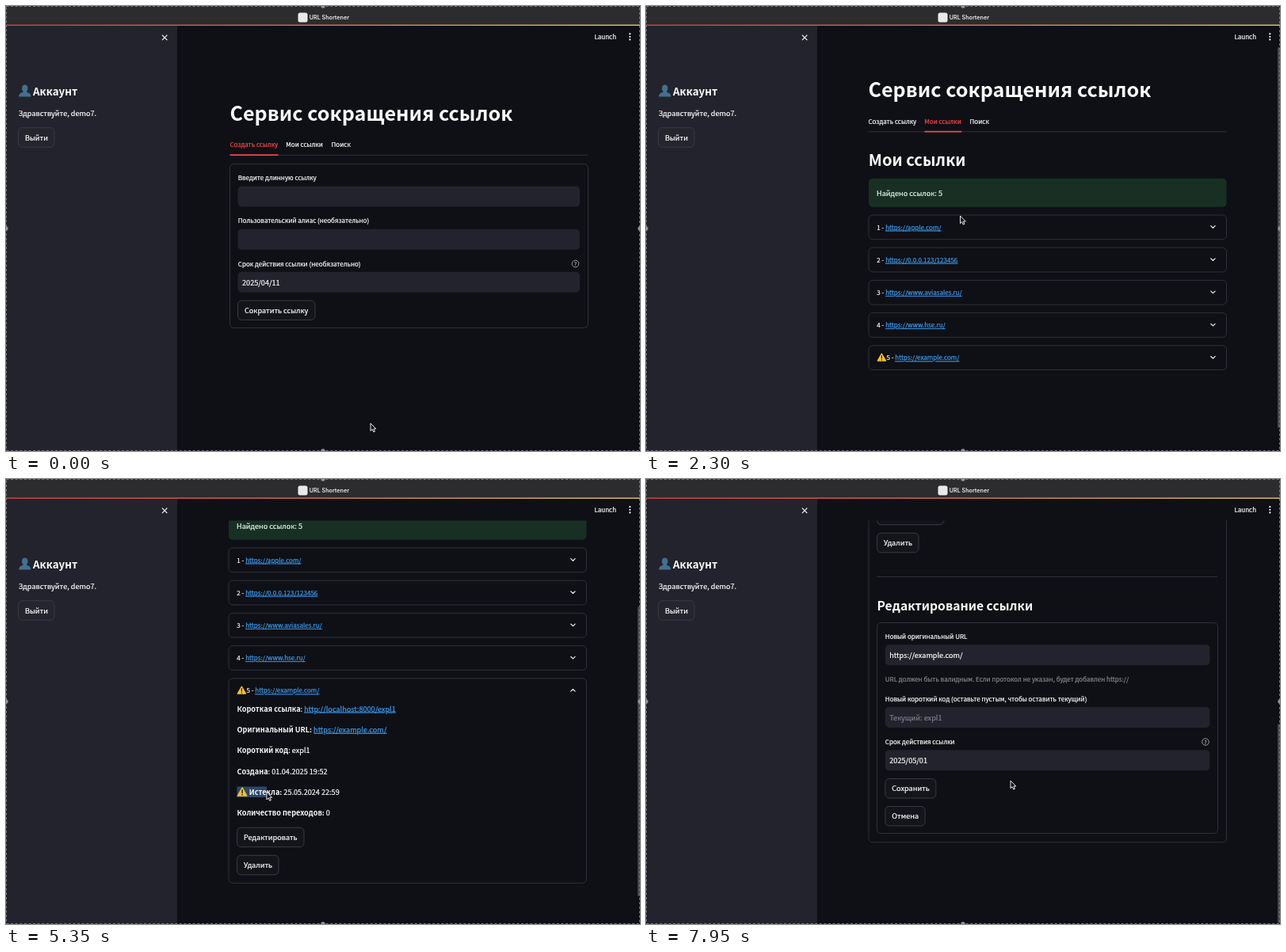
Animation of 800 by 562 pixels, one loop 8 s. Source, as an HTML page:

```html
<!DOCTYPE html>
<html lang="ru">
<head>
<meta charset="utf-8">
<title>URL Shortener</title>
<style>
html, body { margin: 0; width: 100%; height: 100%; overflow: hidden; background: #0e1015; }
svg { display: block; width: 100vw; height: 100vh; }
text {
  font-family: 'Noto Sans CJK JP', 'Noto Sans CJK SC', 'Noto Sans CJK', 'Noto Sans', sans-serif;
  white-space: pre; fill: currentColor; stroke: currentColor; stroke-width: .22px;
}
text[font-weight] { stroke: none; }
.link { color: #3d9df3; fill: currentColor; stroke: currentColor; text-decoration: underline; text-decoration-thickness: .6px; }
.b { font-weight: 700; stroke: none; }
</style>
</head>
<body>
<svg id="stage" viewBox="0 0 800 562" xmlns="http://www.w3.org/2000/svg"></svg>
<script>
const LOOP = 8000;
const WHITE = '#fafafa', RED = '#f8474b', LINE = '#303138', PANEL = '#22232c', BG = '#0e1015', FACE = '#13151b';
const FONT_SCALE = 0.932;
const BODY = 9.82, SMALL = 8.6;

// Markup helpers
const text = (x, y, str, size = BODY, attrs = '') =>
  `<text x="${x}" y="${y}" font-size="${(size * FONT_SCALE).toFixed(2)}" color="${WHITE}" ${attrs}>${str}</text>`;
const rect = (x, y, w, h, fill, attrs = '') =>
  `<rect x="${x}" y="${y}" width="${w}" height="${h}" fill="${fill}" ${attrs}/>`;
const box = (x, y, w, h, attrs = '') => rect(x, y, w, h, 'none', `rx="5" stroke="${LINE}" ${attrs}`);
const link = url => `<tspan class="link">${url}</tspan>`;
const bold = str => `<tspan class="b">${str}</tspan>`;
const button = (x, y, w, label, id = '', face = FACE) =>
  `<g id="${id}">${rect(x, y, w, 24.5, face, 'rx="5" stroke="#393a42"')}${text(x + 8.5, y + 15.8, label)}</g>`;
const field = (x, y, w, value = '', color = WHITE) =>
  rect(x, y, w, 26, PANEL, 'rx="5"') + text(x + 5.5, y + 16.7, value, BODY, `style="color:${color}"`);
const help = (x, y) =>
  `<circle cx="${x}" cy="${y}" r="4.3" fill="none" stroke="#a5a6ab" stroke-width=".9"/>` +
  text(x, y + 2.5, '?', 7, 'text-anchor="middle" style="color:#c0c1c5"');
const warn = (x, y, s) => `<g transform="translate(${x} ${y}) scale(${s})">
  <path d="M6 1 L11.3 10.2 H.7Z" fill="#f9c02f" stroke="#f9c02f" stroke-width="1.2" stroke-linejoin="round"/>
  <path d="M6 3.6V7" stroke="#27231c" stroke-width="1.3" stroke-linecap="round"/>
  <circle cx="6" cy="9" r=".75" fill="#27231c"/></g>`;

const urls = ['https://apple.com/', 'https://0.0.0.123/123456', 'https://www.aviasales.ru/',
  'https://www.hse.ru/', 'https://example.com/'];
const cardY = i => 293.5 + 41.2 * i;
const CARD_H = 30.7, LAST = 4, OPEN_H = 258.5, EDIT_H = 614;

const card = (url, i) => {
  const y = cardY(i), last = i === LAST;
  return box(281, y, 451.5, CARD_H, `id="card${i}"`) + (last ? warn(291.5, y + 9.3, .98) : '') +
    text(last ? 303.5 : 291.3, y + 18.6, `${i + 1} - ${link(url)}`, SMALL, `id="name${i}"`) +
    `<path id="arrow${i}" fill="none" stroke-width="1.15" stroke-linecap="round" stroke-linejoin="round"/>`;
};

const createForm = () => box(280.5, 199.5, 452, 207) +
  text(290.8, 220, 'Введите длинную ссылку', SMALL) + field(290.5, 227.5, 431.5) +
  text(290.8, 274.3, 'Пользовательский алиас (необязательно)', SMALL) + field(290.5, 281.7, 431.5) +
  text(290.8, 328.6, 'Срок действия ссылки (необязательно)', SMALL) + help(716.5, 325.5) +
  field(290.5, 335.8, 431.5, '2025/04/11') + button(290.5, 372, 97.5, 'Сократить ссылку');

const details = () => {
  const rows = [
    bold('Короткая ссылка') + ': ' + link('http://localhost:8000/expl1'),
    bold('Оригинальный URL:') + ' ' + link('https://example.com/'),
    bold('Короткий код') + ': expl1',
    bold('Создана') + ': 01.04.2025 19:52',
    bold('Истекла:') + ' 25.05.2024 22:59',
    bold('Количество переходов:') + ' 0'
  ];
  return rect(291.5, 595, 0, 13.5, '#2b4868', 'id="mark"') +
    rows.map((r, i) => text(i === 4 ? 306.8 : 291.5, 500 + 26.35 * i, r)).join('') +
    warn(291.5, 595.3, 1.1) +
    button(291.5, 646.7, 84.5, 'Редактировать', 'edit') + button(291.5, 681.8, 52.5, 'Удалить');
};

const editForm = () => `<path d="M291.5 737H721.5" stroke="${LINE}"/>` +
  text(291.5, 779.8, 'Редактирование ссылки', 16.8, 'font-weight="600"') +
  box(291.5, 795, 430, 266) +
  text(301.8, 815.8, 'Новый оригинальный URL', SMALL) + field(301.8, 822.8, 409.7, 'https://example.com/') +
  text(301.8, 869.4, 'URL должен быть валидным. Если протокол не указан, будет добавлен https://', SMALL, 'style="color:#85868c"') +
  text(301.8, 894.3, 'Новый короткий код (оставьте пустым, чтобы оставить текущий)', SMALL) +
  field(301.8, 901.4, 409.7, 'Текущий: expl1', '#7d7e86') +
  text(301.8, 948.5, 'Срок действия ссылки', SMALL) + help(706, 945.5) +
  field(301.8, 955.7, 409.7, '2025/05/01') +
  button(301.8, 992, 64, 'Сохранить') + button(301.8, 1027, 50.3, 'Отмена');

const content = () => text(280.5, 144.5, 'Сервис сокращения ссылок', 27, 'font-weight="700"') +
  text(280.5, 178.2, 'Создать ссылку', SMALL, 'id="tab0"') +
  text(351.3, 178.2, 'Мои ссылки', SMALL, 'id="tab1"') + text(408.6, 178.2, 'Поиск', SMALL) +
  `<path d="M280.5 188.3H732.5" stroke="${LINE}"/>` + rect(281, 187.3, 60, 1.7, RED, 'id="bar"') +
  `<g id="create">${createForm()}</g><g id="list">` +
  text(280.8, 231.3, 'Мои ссылки', 21.6, 'font-weight="600"') +
  rect(281, 247.3, 451.5, 36, '#183024', 'rx="5"') + text(291, 269.3, 'Найдено ссылок: 5', BODY, 'style="color:#dff5e6"') +
  urls.map(card).join('') +
  `<g id="details" clip-path="url(#cardClip)">${details()}<g id="editForm">${editForm()}</g></g></g>`;

const chrome = () => rect(0, 0, 800, 24, '#2c2c2e') +
  rect(368.5, 8.5, 12, 12, '#e9e9ea', 'rx="2.5"') +
  `<text x="382.8" y="17.2" font-size="7.15" font-weight="600" color="#e9e9ea" style="font-family:Inter,sans-serif">URL Shortener</text>` +
  rect(0, 23.5, 800, 1.5, 'url(#rainbow)');

const sidebar = () => rect(0, 25, 216, 537, PANEL) +
  `<path d="M197 36.7l6.4 6.4m0-6.4l-6.4 6.4" stroke="${WHITE}" stroke-width="1.2"/>
  <g fill="#43708f"><ellipse cx="23.8" cy="104" rx="3.7" ry="4.5"/>
  <path d="M16.3 114.6c0-4.3 2.2-5 5.4-5.9v-2h4.2v2c3.2.9 5.4 1.6 5.4 5.9Z"/></g>` +
  text(34, 113.2, 'Аккаунт', 14.4, 'font-weight="600"') +
  text(15.7, 138.6, 'Здравствуйте, demo7.') + button(15.5, 153.7, 45.5, 'Выйти', '', '#24252e');

const frame = () => `<rect x=".5" y=".5" width="799" height="561" fill="none" stroke="#77777b" stroke-dasharray="3 2.6"/>` +
  [[400, 0], [400, 562], [0, 281], [800, 281]].map(([x, y]) =>
    `<circle cx="${x}" cy="${y}" r="2.7" fill="#939397"/>`).join('');

document.getElementById('stage').innerHTML = `<defs>
  <linearGradient id="rainbow"><stop offset="0" stop-color="#c93f45"/><stop offset=".45" stop-color="#c96a4a"/><stop offset="1" stop-color="#d8c060"/></linearGradient>
  <clipPath id="view"><rect x="216" y="52.5" width="584" height="510"/></clipPath>
  <clipPath id="cardClip"><rect id="cardArea" x="281" y="${cardY(LAST) + CARD_H - 4}" width="452" height="0"/></clipPath></defs>` +
  rect(0, 0, 800, 562, BG) + `<g clip-path="url(#view)"><g id="main">${content()}</g></g>` +
  rect(797, 52, 3, 481, '#46474d', 'id="thumb" rx="1.5"') +
  text(742.5, 41.8, 'Launch', SMALL) +
  [35.2, 38.8, 42.4].map(y => `<circle cx="787.3" cy="${y}" r="1.1" fill="${WHITE}"/>`).join('') +
  sidebar() + chrome() + frame() +
  `<path id="cursor" d="M0 0V9.6L2.2 7.6 3.8 11 5.4 10.3 3.9 7H6.8Z" fill="#111" stroke="#fff" stroke-width=".9" stroke-linejoin="round"/>`;

const el = {};
document.querySelectorAll('[id]').forEach(n => el[n.id] = n);
const set = (id, attrs) => { for (const k in attrs) el[id].setAttribute(k, attrs[k]); };
const show = (id, on) => set(id, { display: on ? 'inline' : 'none' });

// Keyframes are [time, ...values], eased between neighbours
function track(t, keys) {
  let i = 0;
  while (i < keys.length - 1 && keys[i + 1][0] <= t) i++;
  const a = keys[i], b = keys[i + 1] || a;
  const p = a === b ? 0 : Math.max(0, (t - a[0]) / (b[0] - a[0]));
  const e = p * p * (3 - 2 * p);
  return a.slice(1).map((v, k) => v + (b[k + 1] - v) * e);
}

const cursorPath = [[50, 460, 527], [700, 377, 174], [900, 377, 174], [1050, 378, 191], [1700, 396.5, 265],
  [2400, 396.5, 265], [2950, 445.5, 444.5], [4050, 445.5, 444.5], [4250, 436, 424], [4950, 290, 395],
  [5200, 290, 395], [5620, 422, 396], [5700, 422, 396], [5930, 347, 456.5], [6850, 347, 456.5], [7350, 460, 381]];
const scrollPath = [[1740, 0], [1890, 31.5], [2050, 31.5], [2300, 29.5], [3480, 29.5], [3930, 206.5],
  [6880, 206.5], [7500, 613.5]];
const thumbPath = [[3250, 52, 481], [3480, 62, 366], [3930, 161, 366], [6750, 161, 366], [6770, 128, 252],
  [6880, 128, 252], [7500, 309, 252]];

const SWITCH = 800, OPEN = 3230, EDIT = 6750;

function draw(t) {
  const [cx, cy] = track(t, cursorPath);
  const [scroll] = track(t, scrollPath);
  const listed = t >= SWITCH, opened = t >= OPEN, editing = t >= EDIT;
  const over = (x, y, w, h) => cx >= x && cx <= x + w && cy + scroll >= y && cy + scroll <= y + h;

  set('cursor', { transform: `translate(${cx} ${cy})` });
  set('main', { transform: `translate(${listed ? 0 : 2} ${-scroll})` });
  show('create', !listed);
  show('list', listed);
  set('tab0', { color: listed ? WHITE : RED });
  set('tab1', { color: listed || over(351, 165, 48, 22) ? RED : WHITE });
  const [bx, bw] = track(t, [[SWITCH, 280.5, 61], [1130, 351.3, 47]]);
  set('bar', { x: bx, width: bw });

  const [ty, th] = track(t, thumbPath);
  show('thumb', listed);
  set('thumb', { y: ty, height: th });

  const [grow] = track(t, [[OPEN + 30, CARD_H], [OPEN + 300, OPEN_H]]);
  const cardH = editing ? EDIT_H : grow;
  set('card' + LAST, { height: cardH });
  set('cardArea', { height: Math.max(0, cardH - CARD_H + 4) });
  show('details', opened);
  show('editForm', editing);

  urls.forEach((_, i) => {
    const y = cardY(i), held = i === LAST && opened && t < 4060;
    const color = held || over(281, y + 5, 451, CARD_H - 10) ? RED : WHITE;
    const d = i === LAST && opened ? -1.3 : 1.3;
    set('name' + i, { color });
    set('arrow' + i, { stroke: color, d: `M712.7 ${y + 15 - d}l2.7 ${2 * d} 2.7 ${-2 * d}` });
  });

  const marked = t < 5200 ? 0 : t < 5620 ? Math.min(129.5, Math.max(0, cx - 291.5)) : 129.5;
  set('mark', { width: marked });

  const pressed = t >= 6600 && t < EDIT;
  const hot = over(291.5, 646.7, 84.5, 24.5);
  const [face, label] = el.edit.children;
  face.setAttribute('fill', pressed ? '#ff4549' : FACE);
  face.setAttribute('stroke', pressed || hot ? '#ff4549' : '#393a42');
  label.setAttribute('color', hot && !pressed ? RED : WHITE);
}

const start = performance.now();
(function tick() {
  draw((performance.now() - start) % LOOP);
  requestAnimationFrame(tick);
})();
</script>
</body>
</html>
```
